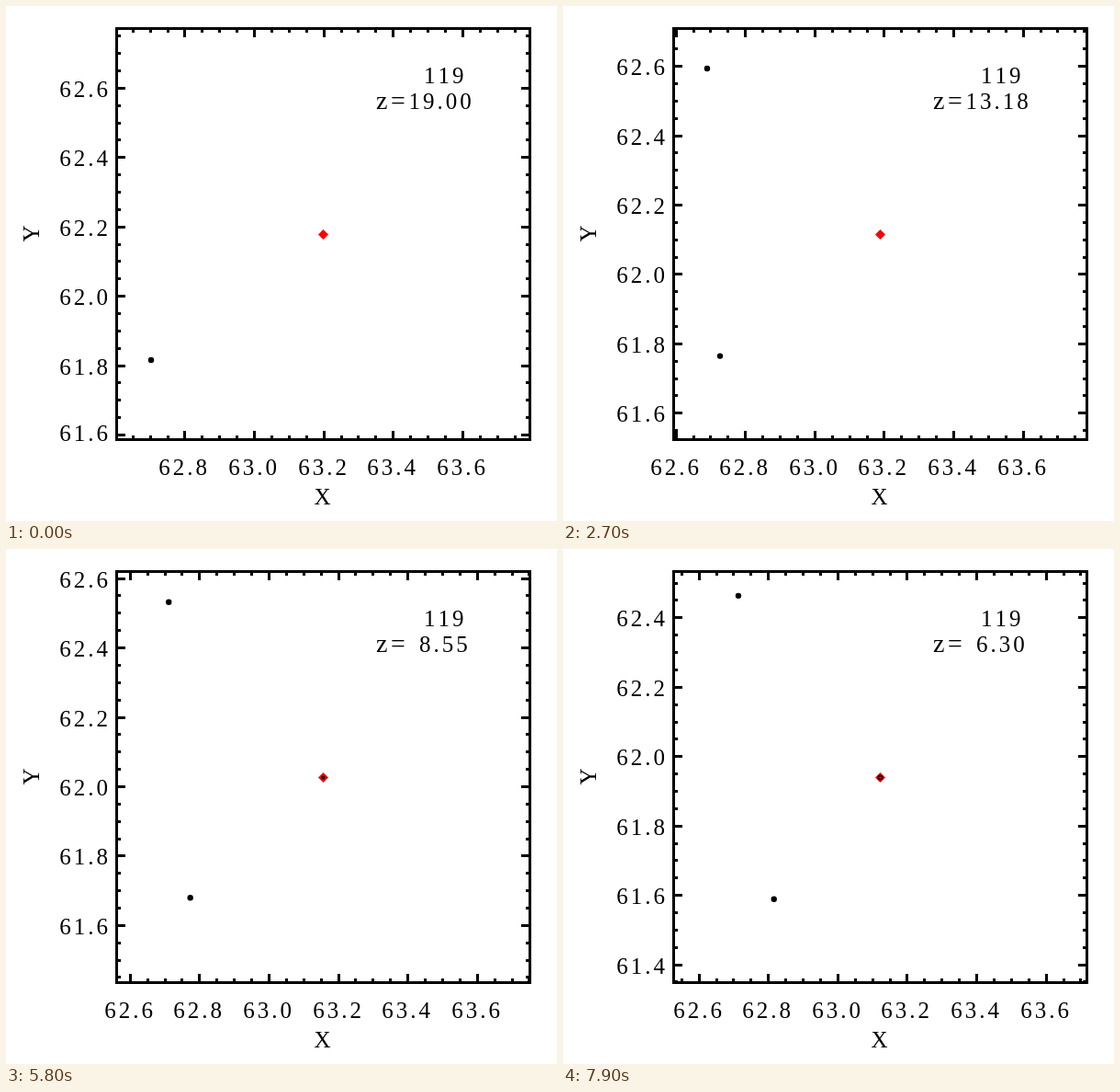
An HTML page that plays this animation: 600x560 px, repeating every 8000 ms.

```html
<!DOCTYPE html>
<html lang="en">
<head>
<meta charset="utf-8">
<title>Position plot</title>
<style>
  html, body { margin: 0; width: 100%; height: 100%; overflow: hidden; background: #fff; }
  svg { display: block; width: 600px; height: 560px; }
  text { font: 25px "Liberation Serif", "Times New Roman", serif; letter-spacing: 3px; font-kerning: none; white-space: pre; }
  .wide { font-size: 28px; letter-spacing: 0; }
  .name { letter-spacing: 0; text-anchor: middle; }
  .axis { fill: none; stroke: #000; stroke-width: 3; shape-rendering: crispEdges; }
</style>
</head>
<body>
<svg viewBox="0 0 600 560">
  <rect width="600" height="560" fill="#fff"/>
  <path class="axis" d="M120.5 24.5H570.5V471.5H120.5Z"/>
  <path class="axis" id="ticks"/>
  <g id="labels"></g>
  <text x="455" y="83.5">119</text>
  <text class="wide" x="403" y="111.5">z<tspan x="419">=</tspan></text>
  <text id="z" y="111.5"></text>
  <text class="name" x="344.5" y="542">X</text>
  <text class="name" transform="translate(35.5 247.5) rotate(-90)">Y</text>
  <circle id="low" r="3.2"/>
  <circle id="high" r="3.2"/>
  <path d="M345.5 243l5.5 5.5l-5.5 5.5l-5.5 -5.5Z" fill="#f00"/>
  <circle id="core" cx="345.5" cy="248.5" fill="none" stroke="#000" stroke-width="1.6"/>
</svg>
<script>
const STEP = 100, COUNT = 80;
const LEFT = 120.5, RIGHT = 570.5, TOP = 24.5, BOTTOM = 471.5;
const SCALE_X = 378, SCALE_Y = 377.3;
const MAJOR = 9.5, MINOR = 4.5;
const HIGH_START = 18, CORE_START = 37;
const $ = id => document.getElementById(id);

// c0 + c1 n + c2 n^2 + ...
const poly = (n, ...c) => c.reduceRight((sum, k) => sum * n + k, 0);

// Each step shrinks 1 + z by the same factor.
const redshift = n => 20 * Math.exp(-0.01275 * n) - 1;

// Pixel places of the values 63.2 and 62.2 as the view drifts.
const originX = n => poly(n, 346.1, 0.025, 0.0043);
const originY = n => poly(n, 240.2, -0.9, 0.00275, -0.000073);

// Calls use(pixel, value, isMajor) for each 0.05 step inside the range.
function eachTick(from, to, anchor, origin, scale, use) {
  for (let i = -20; i <= 20; i++) {
    const p = origin + i * 0.05 * scale;
    if (p >= from && p <= to) use(Math.floor(p) + 0.5, anchor + i * 0.05, i % 4 === 0);
  }
}

const label = (x, y, value) => `<text x="${x}" y="${y}">${value.toFixed(1)}</text>`;

function set(id, attrs) {
  for (const key in attrs) $(id).setAttribute(key, attrs[key]);
}

const shownFrom = (n, first) => n < first ? "hidden" : "visible";

function drawAxes(n) {
  let path = "", text = "";
  eachTick(LEFT, RIGHT, 63.2, originX(n), SCALE_X, (p, v, major) => {
    const len = major ? MAJOR : MINOR;
    path += `M${p} ${BOTTOM}v${-len}M${p} ${TOP}v${len}`;
    if (major) text += label(p - 28.3, 509.5, v);
  });
  eachTick(TOP, BOTTOM, 62.2, originY(n), -SCALE_Y, (p, v, major) => {
    const len = major ? MAJOR : MINOR;
    path += `M${LEFT} ${p}h${len}M${RIGHT} ${p}h${-len}`;
    // Labels stay inside the ends of the axis.
    if (major) text += label(58.3, Math.min(472.5, Math.max(42, p + 9.5)), v);
  });
  set("ticks", { d: path });
  $("labels").innerHTML = text;
}

function draw(n) {
  drawAxes(n);
  const z = redshift(n).toFixed(2);
  $("z").textContent = z;
  set("z", { x: z.length < 5 ? 450 : 438.5 });
  set("low", { cx: poly(n, 158, 0.26, 0.0082), cy: poly(n, 385, -0.22, 0.0021) });
  set("high", {
    cx: poly(n, 139.3, 0.654),
    cy: poly(n, 76.9, -0.33),
    visibility: shownFrom(n, HIGH_START)
  });
  set("core", { r: poly(n, 0.3, 0, 0.0003), visibility: shownFrom(n, CORE_START) });
}

const start = performance.now();
let shown = -1;
function tick() {
  const n = Math.floor((performance.now() - start) / STEP) % COUNT;
  if (n !== shown) draw(shown = n);
  requestAnimationFrame(tick);
}
tick();
</script>
</body>
</html>
```
